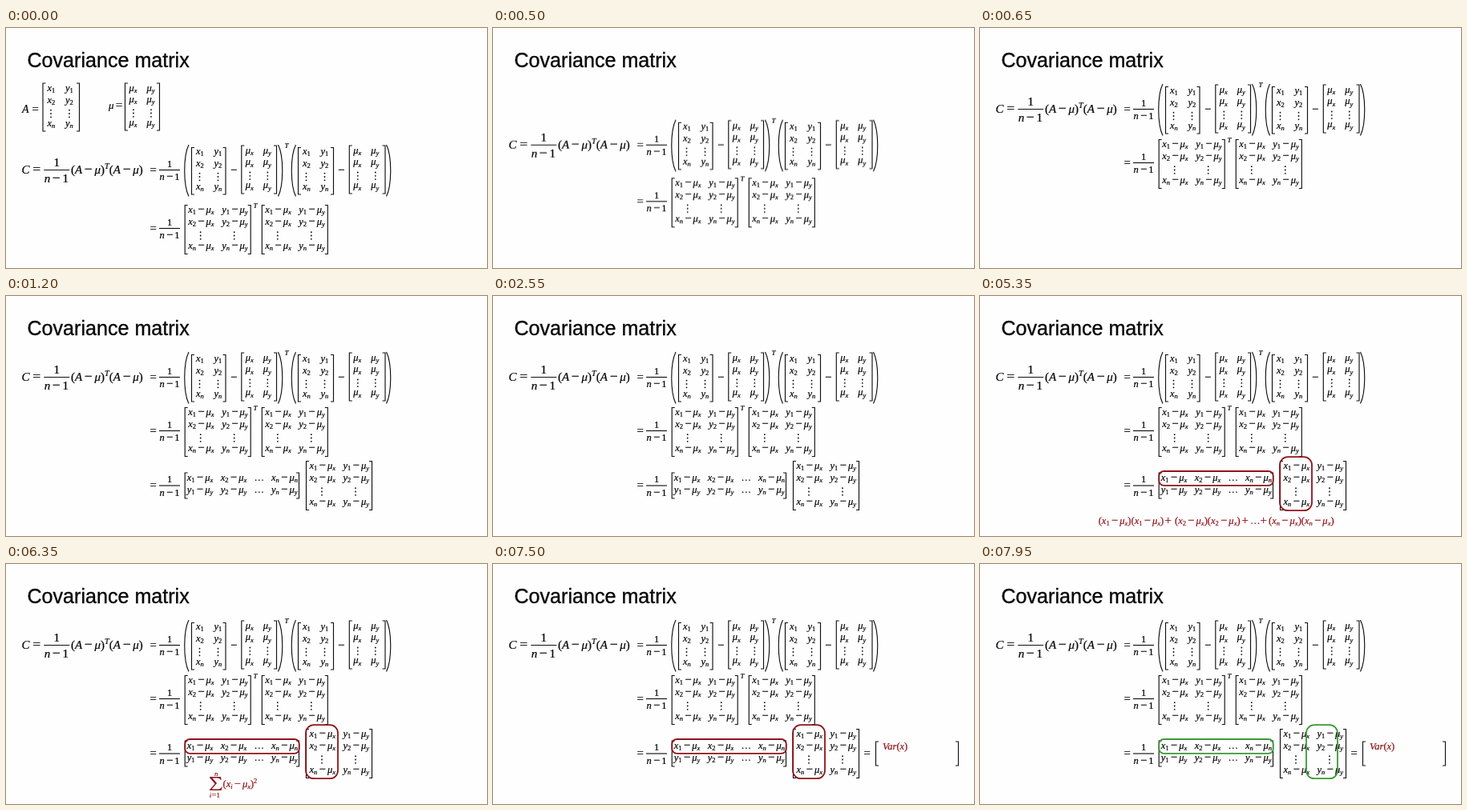
These frames come from a looping animation (600 px wide and 300 px high, 8 s). An HTML page:

```html
<!DOCTYPE html>
<html lang="en">
<head>
<meta charset="utf-8">
<title>Covariance matrix</title>
<style>
  html, body { margin: 0; width: 100%; height: 100%; overflow: hidden; background: #fefefe; }
  svg { display: block; width: 100vw; height: 100vh; color: #080808; fill: currentColor; }
  text {
    font-family: "Liberation Serif", "Times New Roman", serif; white-space: pre;
    fill: currentColor; stroke: currentColor; stroke-width: 0.22;
  }
  .title { font-family: "Liberation Sans", Arial, sans-serif; font-size: 25.1px; stroke-width: 0.35; }
  .red { color: #8f141b; fill: currentColor; }
  .line { fill: none; stroke: #111; stroke-width: 1.15; }
  .ring { fill: none; stroke-width: 1.8; }
</style>
</head>
<body>
<svg id="stage" viewBox="0 0 600 300"></svg>
<script>
const LOOP = 8000;
const stage = document.getElementById('stage');

function node(tag, parent, attrs = {}, text) {
  const el = document.createElementNS('http://www.w3.org/2000/svg', tag);
  for (const k in attrs) el.setAttribute(k, attrs[k]);
  if (text !== undefined) el.textContent = text;
  parent.appendChild(el);
  return el;
}
const group = (cls = '') => node('g', stage, { class: cls });

// Sets a formula: _ lowers and ^ raises the next character.
function math(g, x, y, size, str, space = 0.17) {
  const text = node('text', g, { x, y, 'font-size': size });
  let shift = 0, first = true, afterOp = false;
  for (const [, mark, c] of str.matchAll(/([_^]?)(.)/gu)) {
    const op = /[−=+]/.test(c);
    const level = mark === '_' ? 0.19 * size : mark === '^' ? -0.38 * size : 0;
    node('tspan', text, {
      dx: !first && (op || afterOp) ? space * size : 0,
      dy: level - shift,
      'font-size': size * (mark ? 0.68 : op ? 1.18 : 1),
      'font-style': /\p{L}/u.test(c) ? 'italic' : 'normal'
    }, c);
    shift = level;
    first = false;
    afterOp = op;
  }
}

function bracket(g, x, top, bottom, dir) {
  node('path', g, { class: 'line', d: `M${x + 3.5 * dir} ${top}H${x}V${bottom}H${x + 3.5 * dir}` });
}
function brackets(g, left, right, top, bottom) {
  bracket(g, left, top, bottom, 1);
  bracket(g, right, top, bottom, -1);
}
function paren(g, x, dir) {
  const end = x + 5.5 * dir, bend = x - 1.5 * dir;
  node('path', g, { class: 'line', d: `M${end} 70C${bend} 84 ${bend} 120.5 ${end} 134.5` });
}
function vdots(g, x, y) {
  for (const d of [-4.3, 0, 4.3]) node('circle', g, { cx: x, cy: y + d, r: 0.9 });
}

// One column over rows 1, 2, dots, n.
function column(g, x, base, entry, dotX, rows) {
  ['1', '2', '', 'n'].forEach((k, i) => k
    ? math(g, x, base + rows[i], 12.5, entry(k))
    : vdots(g, dotX, base + rows[i]));
}
const plainRows = [0, 14.5, 28, 43.5];
const wideRows = [0, 14.5, 28.5, 45];

function dataMatrix(g, left, right, top, bottom, base) {
  brackets(g, left, right, top, bottom);
  column(g, left + 5.5, base, k => 'x_' + k, left + 10, plainRows);
  column(g, left + 28, base, k => 'y_' + k, left + 33, plainRows);
}
function meanMatrix(g, left, right, top, bottom, base) {
  brackets(g, left, right, top, bottom);
  column(g, left + 5, base, () => 'μ_x', left + 10.5, plainRows);
  column(g, left + 27, base, () => 'μ_y', left + 32.5, plainRows);
}
function diffMatrix(g, left, top) {
  brackets(g, left, left + 82, top, top + 61);
  column(g, left + 4, top + 9.5, k => `x_${k}−μ_x`, left + 19.5, wideRows);
  column(g, left + 46, top + 9.5, k => `y_${k}−μ_y`, left + 61.5, wideRows);
}

function frac(g, x, y, width, size, gap) {
  math(g, x + width / 2 - size / 4, y - gap, size, '1');
  node('path', g, { class: 'line', d: `M${x} ${y}h${width}` });
  math(g, x + 0.5, y + gap + size * 0.7, size, 'n−1');
}
function equalsFrac(g, y) {
  math(g, 179.5, y + 4.4, 12.5, '=');
  frac(g, 191, y, 26, 12.5, 4);
}
function ring(g, x, y, width, height, r, stroke) {
  node('rect', g, { class: 'ring', x, y, width, height, rx: r, stroke });
}

node('text', stage, { x: 26.5, y: 49.2, class: 'title' }, 'Covariance matrix');

const defs = group();
math(defs, 20, 105.5, 14, 'A');
math(defs, 32.5, 105.5, 12.5, '=');
dataMatrix(defs, 46, 91.5, 69, 129, 79);
math(defs, 128, 101, 13, 'μ=');
meanMatrix(defs, 148.5, 191.5, 69, 128, 78.5);

const row1 = group();
math(row1, 19.5, 106, 15, 'C=', 0.25);
frac(row1, 47.3, 101.5, 32, 15, 5);
math(row1, 81, 106, 15, '(A−μ)^T(A−μ)', 0.18);
equalsFrac(row1, 101.5);
paren(row1, 222.5, 1);
dataMatrix(row1, 231.5, 274, 73.5, 132, 82);
math(row1, 280, 106, 12.5, '−');
meanMatrix(row1, 293.8, 337.5, 71, 131, 80.8);
paren(row1, 345, -1);
math(row1, 347.5, 73.5, 9, 'T');
paren(row1, 356, 1);
dataMatrix(row1, 364.5, 408.5, 73.5, 132, 82);
math(row1, 414, 106, 12.5, '−');
meanMatrix(row1, 428.3, 473, 71, 131, 80.8);
paren(row1, 480, -1);

const row2 = group();
equalsFrac(row2, 168.5);
diffMatrix(row2, 223.2, 139.5);
math(row2, 308.5, 142.5, 9, 'T');
diffMatrix(row2, 319.3, 139.5);

const row3 = group();
equalsFrac(row3, 237);
brackets(row3, 223.2, 365.5, 221, 253);
[['x', 231, 'n'], ['y', 246, 'y']].forEach(([v, y, last]) => {
  const mean = v === 'x' ? 'μ_x' : 'μ_y';
  math(row3, 225.8, y, 12.5, `${v}_1−${mean}`);
  math(row3, 267.8, y, 12.5, `${v}_2−${mean}`);
  math(row3, 309.5, y, 12.5, '…');
  math(row3, 331, y, 12.5, `${v}_n−μ_${last}`);
});
diffMatrix(row3, 374.5, 206.5);

function rings(columnX, width, color) {
  const g = group();
  ring(g, 223.3, 219, 142.5, 17.8, 6, color);
  ring(g, columnX, 201.2, width, 67, 10, color);
  return g;
}
const redRings = rings(374, 40, '#8f141b');
const greenRings = rings(407, 39, '#3a9a35');

const product = group('red');
const square = k => `(x_${k}−μ_x)(x_${k}−μ_x)`;
[[147.7, square(1)], [230.5, '+'], [243, square(2)], [326.5, '+'],
 [337, '…'], [349.5, '+'], [360, square('n')]]
  .forEach(([x, s]) => math(product, x, 284.5, 12.5, s));

const sum = group('red');
math(sum, 260, 264.5, 9, 'n');
node('path', sum, { d: 'M254 266H268L268.6 270H267.8Q267 267.5 264 267.5H257.3L263 274L256.6 281.4' +
  'H265Q268 281.4 269 278.6H269.8L268.6 283H254V282.2L260.6 274.8L254 267Z' });
math(sum, 253.7, 292, 8.8, 'i=1', 0.03);
math(sum, 270.5, 278.5, 12.4, '(x_i−μ_x)^2');

const result = group();
math(result, 462.5, 241.4, 12.5, '=');
brackets(result, 477.5, 580.5, 222, 252);
math(node('g', result, { class: 'red' }), 486, 231.5, 12.5, 'Var(x)');

// Each step is [ms, value, easing].
function play(el, prop, steps, format = v => v) {
  const list = [[0, steps[0][1]], ...steps, [LOOP, steps[steps.length - 1][1]]];
  el.animate(list.map(([ms, v, easing = 'linear']) =>
    ({ offset: ms / LOOP, [prop]: format(v), easing })), { duration: LOOP, iterations: Infinity });
}
const rise = (el, dy) => play(el, 'transform',
  [[380, dy, 'ease-in-out'], [650, 0]], v => `translateY(${v}px)`);
const fade = (el, ...steps) => play(el, 'opacity', steps);

rise(row1, 76);
rise(row2, 82);
fade(defs, [395, 1], [395, 0]);
fade(row3, [820, 0], [1150, 1]);
fade(redRings, [3790, 0], [3790, 1], [7940, 1], [7940, 0]);
fade(product, [4120, 0], [4500, 1], [5830, 1], [6150, 0]);
fade(sum, [5830, 0], [6200, 1], [7080, 1], [7400, 0]);
fade(result, [7080, 0], [7450, 1]);
fade(greenRings, [7940, 0], [7940, 1]);
</script>
</body>
</html>
```
